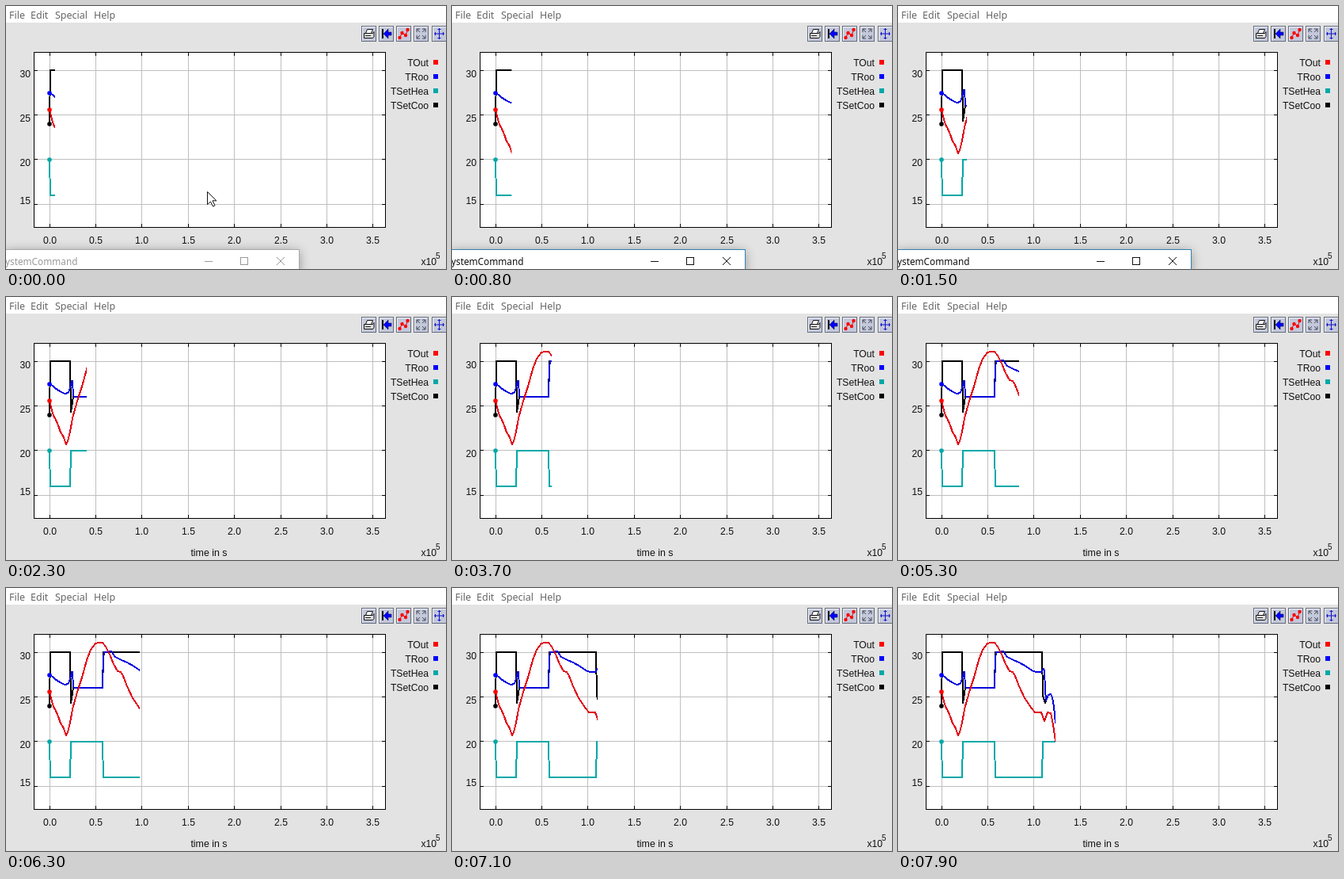
These frames come from a looping animation (556 by 332 pixels, 8 s). An HTML page:

```html
<!DOCTYPE html>
<html lang="en">
<head>
<meta charset="utf-8">
<title>Temperature plot</title>
<style>
html, body { margin: 0; width: 100%; height: 100%; overflow: hidden; background: #e3e3e3; }
svg { display: block; width: 556px; height: 332px; }
text { font: 12.2px "Liberation Sans", Arial, sans-serif; fill: #111; }
.menu text { font: 12.5px "Noto Sans", "Open Sans", sans-serif; fill: #666; }
.end { text-anchor: end; }
.mid { text-anchor: middle; }
.crisp, .curves { shape-rendering: crispEdges; }
.curves polyline { fill: none; stroke-width: 2; stroke-linejoin: round; }

/* The pen advances once every 100 ms. */
#reveal { animation: pen 8s infinite; }
@keyframes pen {
  0% { transform: translateX(62px); animation-timing-function: steps(15); }
  18.75% { transform: translateX(87px); animation-timing-function: steps(8); }
  28.75% { transform: translateX(102px); animation-timing-function: steps(14); }
  46.25% { transform: translateX(126px); animation-timing-function: steps(16); }
  66.25% { transform: translateX(153px); animation-timing-function: steps(10); }
  78.75% { transform: translateX(169px); animation-timing-function: steps(16); }
  98.75%, 100% { transform: translateX(199px); }
}

.dialog { color: #999; animation: activate 8s step-end infinite, close 8s step-end infinite; }
.dialog text { font: 11.8px "Noto Sans", "Open Sans", sans-serif; fill: currentColor; }
.dialog path { fill: none; stroke: currentColor; }
.dialog .edge { stroke: #aaa; animation: edge 8s step-end infinite; }
.shadow { filter: drop-shadow(0 2px 7px rgba(0, 0, 0, .4)); }
@keyframes activate { 0% { color: #999; } 3.75%, 100% { color: #111; } }
@keyframes edge { 0% { stroke: #aaa; } 3.75%, 100% { stroke: #3580b0; } }
@keyframes close { 0% { visibility: visible; } 21.25%, 100% { visibility: hidden; } }

.cursor { animation: leave 8s step-end infinite; }
@keyframes leave { 0% { visibility: visible; } 3.75%, 100% { visibility: hidden; } }
</style>
</head>
<body>
<svg viewBox="0 0 556 332">
  <defs>
    <clipPath id="pen"><rect id="reveal" x="-400" width="400" height="332"/></clipPath>
    <g id="button" class="crisp">
      <rect width="19" height="20" fill="#646a7c"/>
      <rect x="1" y="1" width="17" height="18" fill="#f4f5fa"/>
      <rect x="2" y="2" width="16" height="17" fill="#c3c8da"/>
    </g>
  </defs>

  <rect width="556" height="332" fill="#e3e3e3"/>
  <rect width="556" height="21" fill="#fff"/>
  <g class="menu">
    <text x="4" y="16">File</text>
    <text x="31" y="16">Edit</text>
    <text x="62" y="16">Special</text>
    <text x="111" y="16">Help</text>
  </g>

  <g transform="translate(449 25)">
    <use href="#button"/>
    <path d="M5.500 9.500l2-5h7l-2 5z" fill="#fff" stroke="#111"/>
    <path d="M3.500 9.500h11l1.500-2v6l-1.500 2h-11z" fill="#ddd" stroke="#111"/>
    <path d="M5 12.500h7" stroke="#222"/>
  </g>
  <g transform="translate(471 25)">
    <use href="#button"/>
    <path d="M4 4h2v12h-2z" fill="#111"/>
    <path d="M6 10l6-6v4h4v4h-4v4z" fill="#00f" stroke="#002" stroke-width=".5"/>
  </g>
  <g transform="translate(493 25)">
    <use href="#button"/>
    <path d="M4.500 15l3-6 4.500 3 2.500-7" fill="none" stroke="#e00"/>
    <g fill="#f00">
      <circle cx="4.500" cy="15" r="2.2"/><circle cx="7.500" cy="9" r="2.2"/>
      <circle cx="12" cy="12" r="2.2"/><circle cx="14.500" cy="5" r="2.2"/>
    </g>
  </g>
  <g transform="translate(515 25)">
    <use href="#button"/>
    <path d="M4 8v-4h4M11 4h4v4M15 12v4h-4M8 16h-4v-4M4 4l4 4M15 4l-4 4M15 16l-4-4M4 16l4-4"
          fill="none" stroke="#444956"/>
  </g>
  <g transform="translate(538 25)">
    <use href="#button"/>
    <path d="M9.500 3v14M3 10h13M7.500 4.500h4M7.500 15.500h4M4.500 8v4M14.500 8v4"
          fill="none" stroke="#11c"/>
  </g>

  <rect class="crisp" x="35.500" y="58.500" width="444" height="221" fill="#fff"/>
  <path id="grid" class="crisp" stroke="#bfbfbf"/>
  <path id="ticks" class="crisp" stroke="#000"/>
  <rect class="crisp" x="35.500" y="58.500" width="444" height="221" fill="none" stroke="#000"/>
  <g id="labels"></g>
  <text x="256.500" y="327" class="mid" style="font-size:12.4px">time in s</text>
  <text x="524.500" y="327">x10</text>
  <text x="543" y="319" style="font-size:10px">5</text>

  <g class="curves" clip-path="url(#pen)">
    <polyline stroke="#000" points="55,149 56,81 81,81 82,145 85,126 122,126 123,81 182,81 183,136 186,145 190,135 193,134 195,138 197,150 199,171"/>
    <polyline stroke="#00a8a8" points="55,194 56,239 81,239 82,194 122,194 123,239 182,239 183,194 200,194"/>
    <polyline stroke="#00d" points="55,110 59,112 62,115 68,119 73,121.500 76,122 79,120 81,115 83,106 84,106 85,124 86,126 122,126 123,90 124,81 133,80 138,87 146,91 153,94 162,99 169,104 174,106 181,106 184,102 185,104 186,128 187,142 190,135 193,134 195,138 197,150 199,171"/>
    <polyline stroke="#e00010" points="55,131 58,143 60,150 62,153 66,162 69,171 72,175 76,186 78,182 81,170 84,153 87,142 91,128 96,113 102,91 107,78 113,70 117,69 122,69 126,74 131,84 136,96 141,105 145,106 148,111 153,124 160,139 169,152 173,157 181,157 185,168 189,157 193,158 196,172 199,194"/>
  </g>
  <g id="marks"></g>

  <g class="dialog">
    <rect class="crisp shadow" x="-1" y="308" width="371" height="30" fill="#fff"/>
    <path class="crisp edge" d="M0 307.500H370.500V332"/>
    <text x="-1" y="327">ystemCommand</text>
    <path class="crisp" d="M251 322.500h10M296.500 317.500h9v9h-9z"/>
    <path d="M342 317l10 10M352 317l-10 10"/>
  </g>

  <path class="cursor" d="M254.500 234.500v16l4-3.500 3 6 2.500-1.200-3-6h5z" fill="#fff" stroke="#111"/>
</svg>
<script>
const NS = "http://www.w3.org/2000/svg";
const byId = id => document.getElementById(id);

function add(parent, tag, attrs, text = "") {
  const el = document.createElementNS(NS, tag);
  for (const key in attrs) el.setAttribute(key, attrs[key]);
  el.textContent = text;
  parent.append(el);
}

let grid = "", ticks = "";
const labels = byId("labels");

for (let i = 0; i < 8; i++) {
  const x = Math.floor(55.28 + i * 58.35) + 0.5;
  grid += `M${x} 59V279`;
  ticks += `M${x} 59v4M${x} 279v-4`;
  add(labels, "text", { x, y: 300, class: "mid" }, (i / 2).toFixed(1));
}
for (let i = 0; i < 4; i++) {
  const line = Math.floor(81.2 + i * 56.33);
  const y = line + 0.5;
  grid += `M36 ${y}H479`;
  ticks += `M36 ${y}h4M479 ${y}h-4`;
  // The lowest label sits on its line; the others are centred lower.
  add(labels, "text", { x: 31, y: i < 3 ? line + 9 : line, class: "end" }, 30 - 5 * i);
}
byId("grid").setAttribute("d", grid);
byId("ticks").setAttribute("d", ticks);

[["TOut", "#f00", 131], ["TRoo", "#00f", 110], ["TSetHea", "#00a8a8", 194], ["TSetCoo", "#000", 149]]
  .forEach(([name, fill, start], i) => {
    const base = 76 + i * 18;
    add(labels, "text", { x: 534, y: base, class: "end" }, name);
    add(labels, "rect", { x: 540, y: base - 8, width: 6, height: 6, fill });
    add(byId("marks"), "circle", { cx: 55, cy: start, r: 2.8, fill });
  });
</script>
</body>
</html>
```
